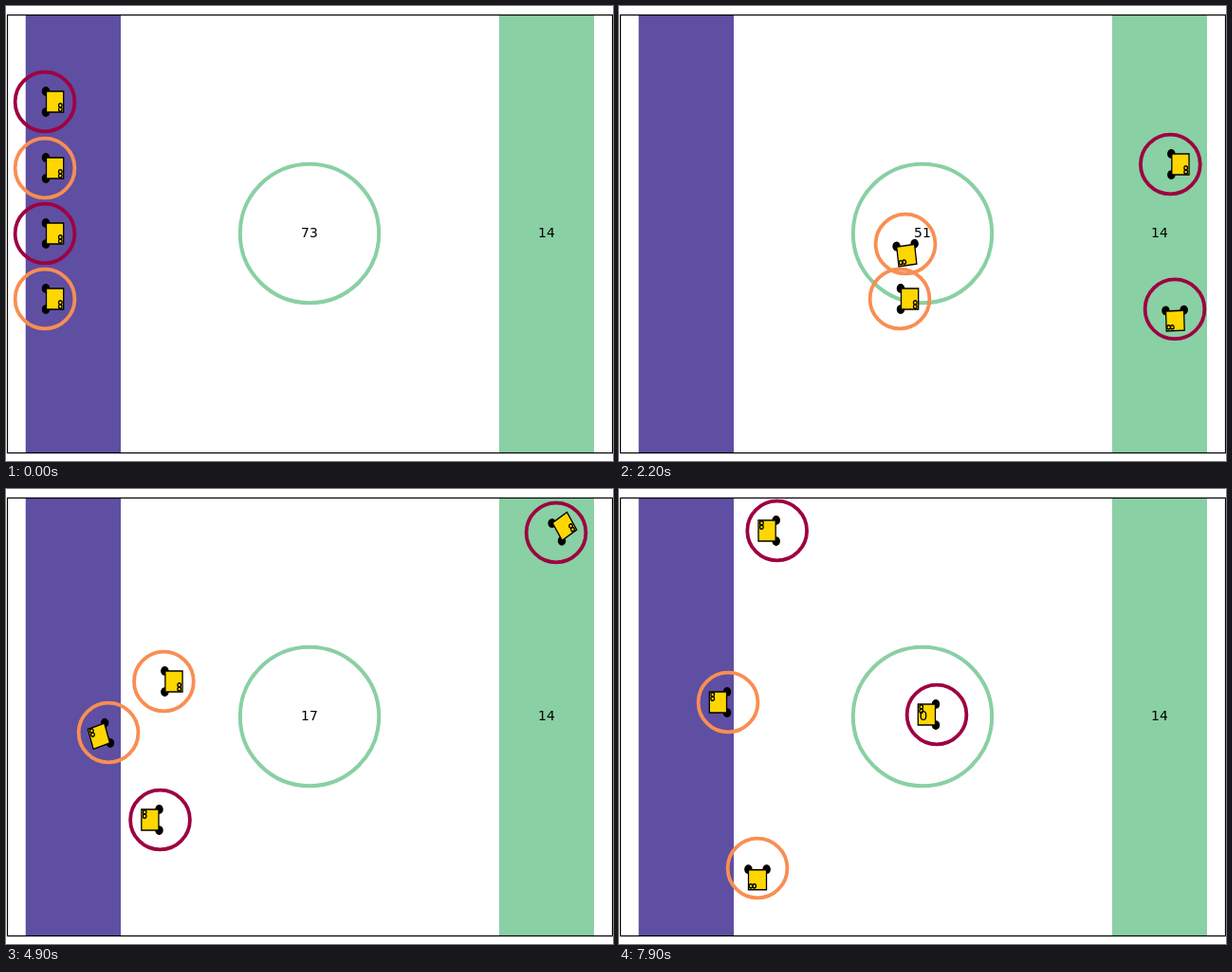
An HTML page that plays this animation: 640x480 px, repeating every 8 s.

```html
<!DOCTYPE html>
<html>
<head>
<meta charset="utf-8">
<style>
html, body { margin: 0; width: 100%; height: 100%; overflow: hidden; background: #fff; }
svg { display: block; }
text { font: 13.9px "DejaVu Sans", sans-serif; text-anchor: middle; }
</style>
</head>
<body>
<svg width="640" height="480" viewBox="0 0 640 480">
  <defs>
    <g id="bot" stroke="#000" stroke-width="1.3">
      <circle cx="1" cy="-9.6" r="3.6"/>
      <circle cx="1" cy="9.6" r="3.6"/>
      <path d="M1.5-9.5H19.7V9.5H1.5Z" fill="#ffd700"/>
      <circle cx="16.3" cy="3.3" r="1.8" fill="none"/>
      <circle cx="16.3" cy="7" r="1.8" fill="none"/>
    </g>
  </defs>
  <rect x="20.7" y="9.5" width="100.3" height="462" fill="#5e4fa2"/>
  <rect x="520" y="9.5" width="100" height="462" fill="#89d0a4"/>
  <circle cx="320" cy="240" r="73.2" fill="none" stroke="#89d0a4" stroke-width="4"/>
  <g id="robots"></g>
  <rect x="1.5" y="9.5" width="638" height="462" fill="none" stroke="#000" stroke-width="1.2"/>
  <text id="load" y="244"></text>
  <text x="569.9" y="244">14</text>
</svg>
<script>
const STEP = 100, LOOP = 8000;
const ASPECT = 1.155;   // vertical over horizontal scale of the arena
const PAUSE = 0.58;     // steps lost when turning
const EASE = 0.8;       // steps in which a turn closes by a factor e
const RED = '#9e0142', ORANGE = '#f98e52';

// Heading in degrees and unit vector of each drive command
const DIRS = { R: [0, 1, 0], D: [90, 0, 1], L: [180, -1, 0], U: [270, 0, -1] };

const robots = document.getElementById('robots');
const load = document.getElementById('load');

const shortest = angle => ((angle + 180) % 360 + 360) % 360 - 180;

// Turns "R284 W2 ..." (drive so many pixels, wait so many steps) into timed legs.
function plan(y, speed, route) {
  let x = 41, start = 0, aim = 0;
  return route.split(' ').map(word => {
    const size = +word.slice(1), [angle, dx, dy] = DIRS[word[0]] || [aim, 0, 0];
    const diff = shortest(angle - aim);
    const turn = Math.abs(diff) === 180 ? 0 : diff;   // opposite commands back up
    const drive = dx || dy ? size / (speed * (dy ? ASPECT : 1)) : size;
    const leg = { x, y, start, turn, dx: dx * size, dy: dy * size, pause: turn ? PAUSE : 0, drive };
    x += leg.dx;
    y += leg.dy;
    aim += turn;
    start += leg.pause + drive;
    return leg;
  });
}

function poseAt(legs, step) {
  const past = legs.filter(leg => leg.start <= step);
  const { x, y, dx, dy, start, pause, drive } = past[past.length - 1];
  const k = Math.max(0, Math.min(1, (step - start - pause) / drive));
  const heading = past.reduce((sum, leg) => sum + leg.turn * (1 - Math.exp((leg.start - step) / EASE)), 0);
  return { x: x + dx * k, y: y + dy * k, heading };
}

function addRobot(color, y, speed, route) {
  robots.insertAdjacentHTML('beforeend',
    `<g><circle r="31.4" fill="none" stroke="${color}" stroke-width="3.8"/><use href="#bot"/></g>`);
  const group = robots.lastElementChild;
  return { group, body: group.lastElementChild, legs: plan(y, speed, route) };
}

const team = [
  addRobot(RED, 101, 28.67,
    'R284 D66 R263 D126 W1.7 R2 W6.4 L11 U247 W4.4 R1 W8 R8 L2 W2.9 U2 W3.1 L420'),
  addRobot(ORANGE, 171, 19.6,
    'R140 D50 R121 W3.4 D30 L243 W.6 U46 L6 U2 W2.9 R224 W2.4 D45 U53 D30 W.6 L220 R58'),
  addRobot(RED, 240, 28.67,
    'R545 D131 W4.3 R4 W3.7 U22 L455 U65 R178 W1.2 U2 W.9 U44 L63 W4 R85'),
  addRobot(ORANGE, 309, 11.86,
    'W.5 R280 U52 W1.5 L213 W.3 D4 L36 U31 R74 W2 D170')
];

// Amount left in the round zone, which drops as robots pick up
function amountAt(step) {
  if (step < 8) return 73;
  if (step < 14) return 68;
  if (step < 23) return 51;
  return step < 54 ? 17 : 0;
}

function draw(now) {
  const step = Math.floor(now % LOOP / STEP);
  for (const { group, body, legs } of team) {
    const { x, y, heading } = poseAt(legs, step);
    group.setAttribute('transform', `translate(${x} ${y})`);
    body.setAttribute('transform', `scale(1 ${ASPECT}) rotate(${heading})`);
  }
  const amount = amountAt(step);
  load.textContent = amount;
  load.setAttribute('x', amount ? 319.9 : 320.8);
  requestAnimationFrame(() => draw(performance.now()));
}
draw(0);
</script>
</body>
</html>
```
